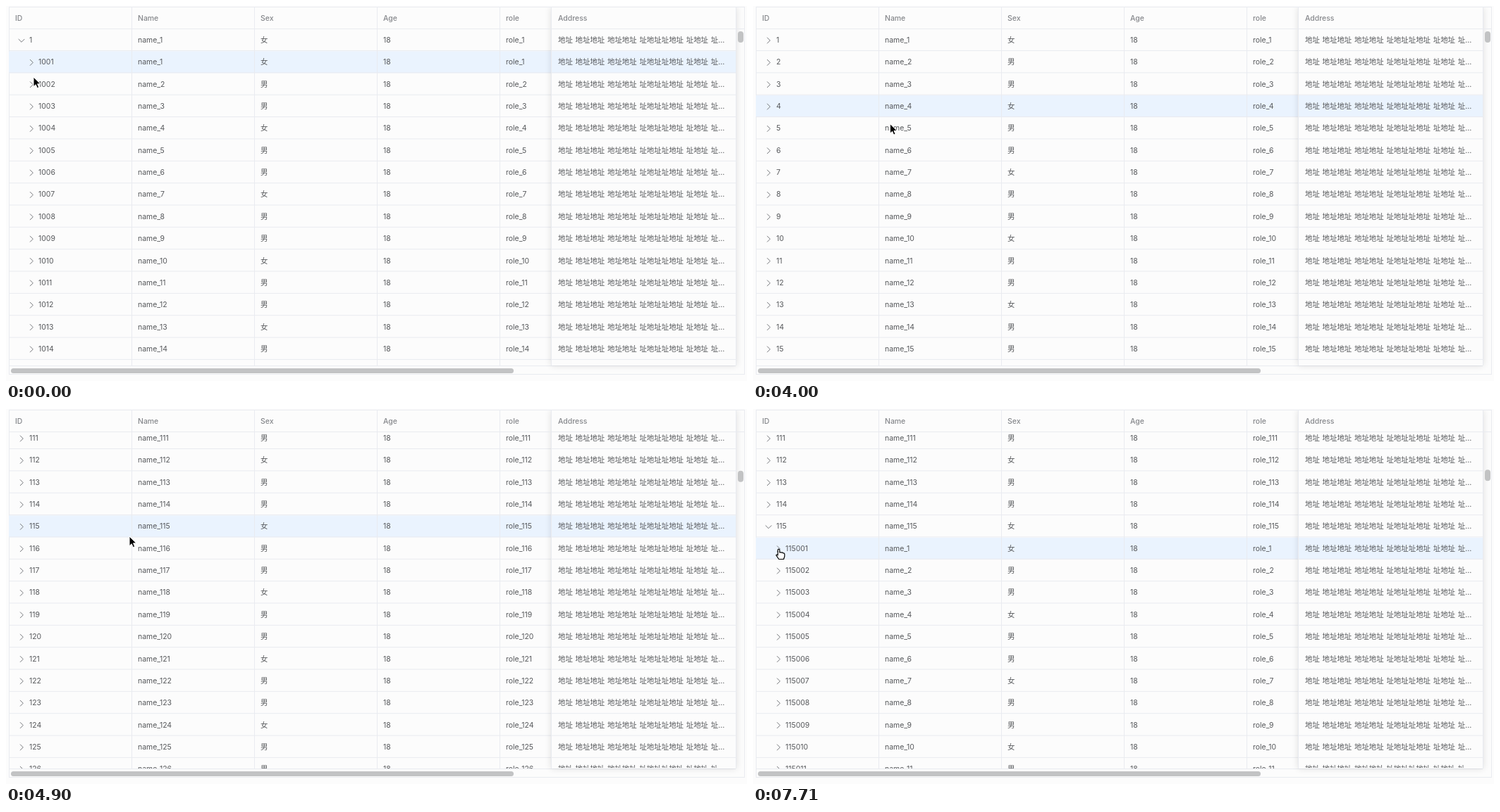
Write an HTML page that moves like this. It is 1051x533 px and loops after 8 s.

```html
<!DOCTYPE html>
<html lang="en">
<head>
<meta charset="utf-8">
<title>Tree table</title>
<style>
  html, body { margin: 0; width: 100%; height: 100%; overflow: hidden; background: #fcfcfc; }
  body { position: relative; color: #56585b; font: 10.45px/31px Inter, "Noto Sans CJK SC", "Noto Sans CJK", sans-serif; }
  div, span, svg { position: absolute; white-space: pre; box-sizing: border-box; }
  svg { overflow: visible; }
  #frame { left: 3.5px; top: 1px; width: 1044.5px; height: 522.5px; border: 1px solid #e9ebf0; }
  #main { left: 4px; top: 33px; width: 1031px; height: 478px; overflow: hidden; }
  #fixed { left: 773px; top: 2px; width: 263px; height: 508.5px; background: #fcfcfc; border: solid #e9ebf0; border-width: 0 1px; box-shadow: 0 0 9px rgba(0, 0, 0, .12); clip-path: inset(0 -12px -12px -12px); }
  #side { left: 0; top: 31px; width: 261px; height: 477px; overflow: hidden; word-spacing: .75px; }
  .row { left: 0; top: 0; width: 100%; height: 31.35px; border-bottom: 1px solid #e9ebf0; }
  .hot { background: #eaf3fe; }
  .vline { width: 1px; top: 2px; height: 509px; background: #e9ebf0; }
  #headline { left: 4px; top: 32px; width: 1043px; height: 1px; background: #e9ebf0; }
  .head { top: 1.5px; color: #85878b; font-weight: 500; }
  .icon { top: 15.5px; width: 1px; height: 1px; }
  .icon path { fill: none; stroke: #77797d; stroke-width: 1; }
  .thumb { background: #c2c3c4; border-radius: 4px; }
  #vthumb { left: 1038px; top: 36px; width: 8px; height: 15.5px; }
  #hthumb { left: 7px; top: 514.5px; width: 713px; height: 7px; }
  #bottom { left: 4px; top: 510.5px; width: 1031px; height: 1px; background: #e9ebf0; }
  #cursor { left: 0; top: 0; width: 1px; height: 1px; }
</style>
</head>
<body>
<div id="frame"></div>
<div id="main"></div>
<div id="bottom"></div>
<div id="fixed"><div id="side"></div></div>
<div id="headline"></div>
<div id="vthumb" class="thumb"></div>
<div id="hthumb" class="thumb"></div>
<svg id="cursor"><path stroke-linejoin="round"/></svg>
<script>
const LOOP = 8000, TICK = 148.3, LAST = 52;
const ROW = 31.35, TOP = 33, VIEW = 478, COUNT = 17;
const ADDRESS = '地址 地址地址 地址地址 址地址址地址 址地址 址…';
const CHEVRON = 'M-2-4.3L2.3 0L-2 4.3';
const SPOKE = 'M2.3 0H4.6';
const ARROW = 'M0 0V13.6L3.2 10.7L5.3 15.6L7.7 14.6L5.6 9.8H9.9Z';
const HAND = 'M-1.3 1Q0-.8 1.3 1V5Q2.6 4 3.8 5.2Q5.2 4.4 6.2 5.9Q8 5.4 8.3 7.2V10.5L7 14.5H.2L-3.6 8.8Q-3.4 7.2-1.3 8.8Z';

// Cursor moves: start tick, end tick, destination. It rests in between.
const moves = [[-1, 0, 39, 101], [3, 6, 46, 149], [6, 9, 36.5, 80.5], [16, 19, 22, 51],
  [20, 21, 30, 91], [21, 28, 204, 172], [32, 33, 175, 181], [33, 37, 21, 170],
  [39, 42, 66, 251], [42, 45, 98, 288], [46, LAST, 36.5, 199]];
const opened = { 1: [-9, 21], 1001: [1, 16], 115: [46, 99] };
const loading = { id: 115, from: 39, to: 46 };
const wheel = { from: 27, ticks: 5.452, distance: 3455.5 };

const $ = id => document.getElementById(id);
const iconX = level => level ? 36 : 22;
const isOpen = (id, k) => opened[id][0] <= k && k < opened[id][1];

function ease(u) {
  u = Math.min(1, Math.max(0, u));
  return u * u * (3 - 2 * u);
}

const scrollAt = k => wheel.distance * ease((k - wheel.from) / wheel.ticks);

const cursorAt = k => moves.reduce(([x, y], [from, to, toX, toY]) => {
  const u = ease((k - from) / (to - from));
  return [x + (toX - x) * u, y + (toY - y) * u];
}, [37, 88]);

const indexAt = (y, scroll) => Math.floor((y - TOP + scroll) / ROW);

// The highlight trails the cursor by one tick and is off while the wheel spins.
function hoverAt(k) {
  const scroll = scrollAt(k);
  const spinning = scroll - scrollAt(k - 1) > 3 * ROW;
  return spinning ? -1 : indexAt(cursorAt(k - 1)[1], scroll);
}

function turn(id, k) {
  const span = opened[id];
  if (!span || k < span[0] || k > span[1]) return 0;
  return k === span[0] ? 45 : k === span[1] ? 65 : 90;
}

function rowAt(i, k) {
  const root = [1, 115].find(id => isOpen(id, k));
  if (!root || i < root) return { id: i + 1, n: i + 1, level: 0 };
  const n = i - root + 1;
  if (root === 1 && n > 1 && isOpen(1001, k)) return { id: 1001000 + n - 1, n: n - 1, level: 2 };
  return { id: root * 1000 + n, n, level: 1 };
}

function overIcon([x, y], k) {
  const scroll = scrollAt(k), i = indexAt(y, scroll), { level } = rowAt(i, k);
  const iconY = TOP + (i + .5) * ROW - scroll;
  return level < 2 && Math.hypot(x - iconX(level), y - iconY) < 6;
}

function add(parent, tag, cls, left, text = '') {
  const el = document.createElement(tag);
  el.className = cls;
  el.style.left = left + 'px';
  el.textContent = text;
  parent.append(el);
  return el;
}

const columns = ['ID', 'Name', 'Sex', 'Age', 'role'].map((title, i) => ({ title, x: 4 + i * 174 }));
columns.forEach(({ title, x }, i) => {
  $('fixed').before(add(document.body, 'span', 'head', x + 9, title));
  if (i) $('fixed').before(add(document.body, 'div', 'vline', x));
});
add($('fixed'), 'span', 'head', 9, 'Address').style.top = '-.5px';

const rows = Array.from({ length: COUNT }, () => {
  const el = add($('main'), 'div', 'row', 0);
  const side = add($('side'), 'div', 'row', 0);
  el.innerHTML = '<svg class="icon"><path class="chevron"/><g></g></svg>';
  el.querySelector('g').innerHTML = Array.from({ length: 8 }, (_, i) =>
    `<path d="${SPOKE}" transform="rotate(${i * 45})"/>`).join('');
  el.querySelector('.chevron').setAttribute('d', CHEVRON);
  add(side, 'span', '', 9, ADDRESS);
  const cells = columns.map(({ x }) => add(el, 'span', '', x + 5));
  cells[3].textContent = '18';
  return { el, side, cells, icon: el.querySelector('svg'),
    chevron: el.querySelector('.chevron'), spinner: el.querySelector('g') };
});

function drawRow(row, i, k, scroll) {
  const { id, n, level } = rowAt(i, k);
  for (const el of [row.el, row.side]) {
    el.style.transform = `translateY(${i * ROW - scroll}px)`;
    el.classList.toggle('hot', i === hoverAt(k));
  }
  const [idCell, name, sex, , role] = row.cells;
  idCell.textContent = id;
  idCell.style.left = 29 + level * 13 + 'px';
  name.textContent = 'name_' + n;
  sex.textContent = n % 3 === 1 ? '女' : '男';
  role.textContent = 'role_' + n;

  const busy = id === loading.id && k >= loading.from && k < loading.to;
  row.icon.style.display = level === 2 ? 'none' : '';
  row.icon.style.left = iconX(level) - 4 + 'px';
  row.chevron.style.display = busy ? 'none' : '';
  row.spinner.style.display = busy ? '' : 'none';
  row.chevron.setAttribute('transform', `rotate(${turn(id, k)})`);
  row.spinner.setAttribute('transform', `rotate(${(k - loading.from) * 27})`);
}

function drawThumb(k, scroll) {
  const total = 1000 + (isOpen(115, k) ? 30 : 0);
  const y = scroll / (total * ROW - VIEW) * (VIEW - 15.5);
  $('vthumb').style.transform = `translateY(${y}px)`;
}

function drawCursor(k) {
  const [x, y] = cursorAt(k), hand = overIcon([x, y], k);
  const shape = $('cursor').firstElementChild;
  shape.setAttribute('d', hand ? HAND : ARROW);
  shape.setAttribute('fill', hand ? '#fff' : '#000');
  shape.setAttribute('stroke', hand ? '#000' : '#fff');
  shape.setAttribute('stroke-width', hand ? 1.2 : 1);
  $('cursor').style.transform = `translate(${x}px, ${y}px)`;
}

function draw(k) {
  const scroll = scrollAt(k), first = Math.floor(scroll / ROW);
  rows.forEach((row, i) => drawRow(row, first + i, k, scroll));
  drawThumb(k, scroll);
  drawCursor(k);
}

const start = performance.now();
let shown = -1;
function play() {
  const time = (performance.now() - start) % LOOP;
  const k = Math.min(LAST, Math.floor((time + 17) / TICK));
  if (k !== shown) draw(shown = k);
  requestAnimationFrame(play);
}
play();
</script>
</body>
</html>
```
